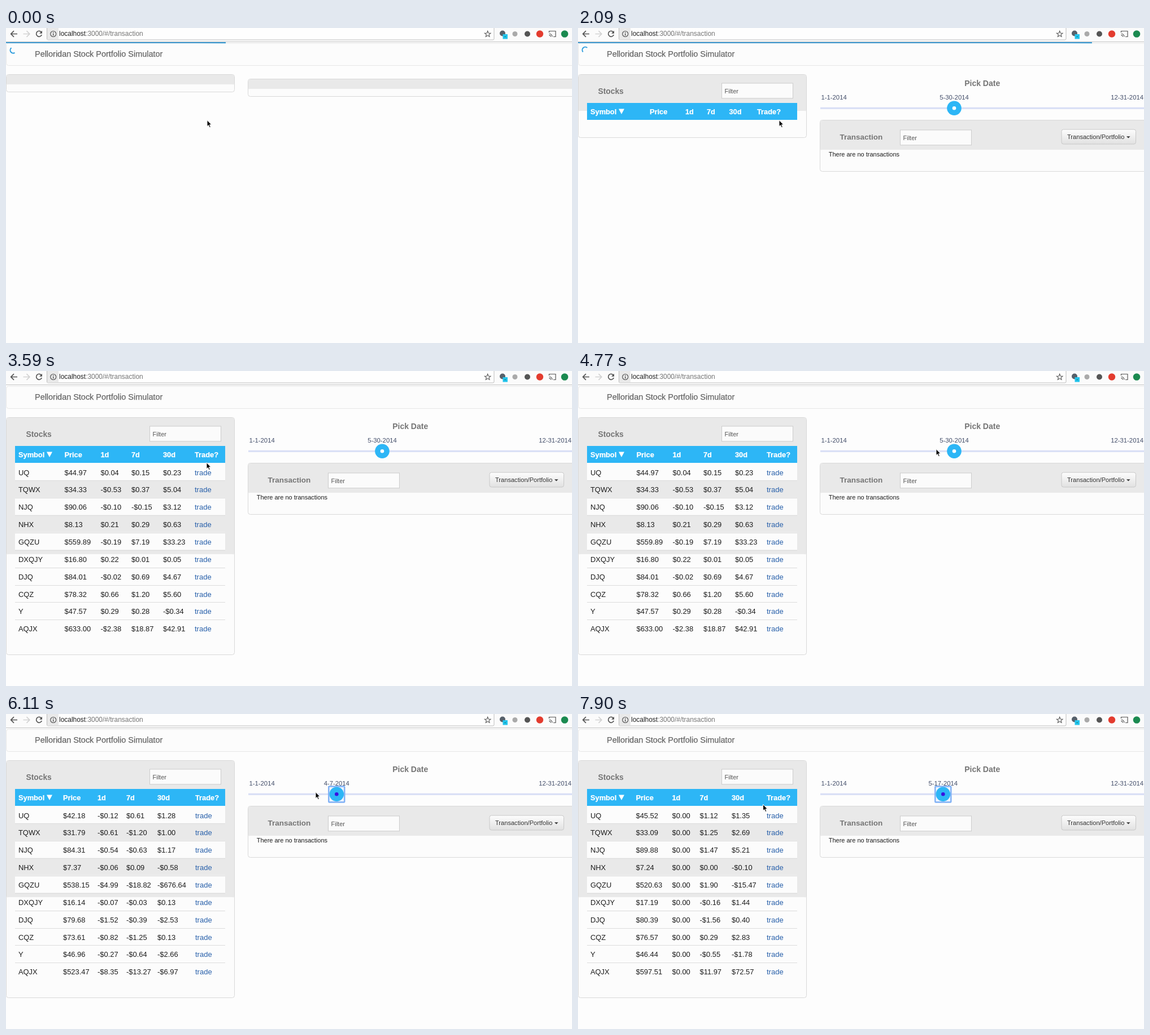
An HTML page for the animation above (8000 ms loop, 1002 by 559 pixels).

```html
<!DOCTYPE html>
<html lang="en">
<head>
<meta charset="utf-8">
<title>Portfolio simulator</title>
<style>
html, body { margin: 0; width: 100%; height: 100%; overflow: hidden; background: #fdfdfd; }
svg { display: block; width: 1002px; height: 559px; font-family: "Liberation Sans", Arial, sans-serif; }
text { white-space: pre; }
</style>
</head>
<body>
<svg id="stage" viewBox="0 0 1002 559">
  <defs>
    <linearGradient id="button" x2="0" y2="1"><stop stop-color="#fdfdfd"/><stop offset="1" stop-color="#e1e1e1"/></linearGradient>
    <linearGradient id="peg"><stop stop-color="#29a0e0" stop-opacity="0"/><stop offset="1" stop-color="#29a0e0" stop-opacity=".45"/></linearGradient>
  </defs>
  <g id="page"></g>
  <g id="loader"></g>
  <g id="chrome"></g>
  <g id="cursor"></g>
</svg>
<script>
const LOOP = 8000, TICK = 149.2;
const VIEW_AT = 1790, DATA_AT = 2238;
const BLUE = '#2db6f6', GREY = '#e9e9e9', EDGE = '#d9d9d9', INK = '#1c1c1c';
const symbols = 'UQ TQWX NJQ NHX GQZU DXQJY DJQ CQZ Y AQJX'.split(' ');
const headings = ['Price', '1d', '7d', '30d', 'Trade?'];

// Each day: start time, slider centre, label, column starts, and rows of price / 1d / 7d / 30d.
const days = [
  { at: 0, x: 666, label: '5-30-2014', cols: [103.5, 167.5, 222, 278, 334], rows:
    '44.97 0.04 0.15 0.23|34.33 -0.53 0.37 5.04|90.06 -0.10 -0.15 3.12|8.13 0.21 0.29 0.63|559.89 -0.19 7.19 33.23|' +
    '16.80 0.22 0.01 0.05|84.01 -0.02 0.69 4.67|78.32 0.66 1.20 5.60|47.57 0.29 0.28 -0.34|633.00 -2.38 18.87 42.91' },
  { at: 5070, x: 634.3, label: '5-9-2014', cols: [102.5, 166, 220, 273.5, 335], rows:
    '44.40 0.14 0.33 0.32|31.84 0.11 -0.16 0.13|88.41 0.50 1.05 4.38|7.24 -0.06 -0.11 -0.57|518.73 7.73 -9.20 -45.41|' +
    '17.35 0.22 0.45 1.52|81.95 0.35 1.64 1.48|76.28 0.42 2.42 1.83|46.99 -0.15 -0.74 -0.17|585.54 -2.45 -7.04 55.22' },
  { at: 5810, x: 585.3, label: '4-7-2014', cols: [101, 162, 213, 268, 335], rows:
    '42.18 -0.12 0.61 1.28|31.79 -0.61 -1.20 1.00|84.31 -0.54 -0.63 1.17|7.37 -0.06 0.09 -0.58|538.15 -4.99 -18.82 -676.64|' +
    '16.14 -0.07 -0.03 0.13|79.68 -1.52 -0.39 -2.53|73.61 -0.82 -1.25 0.13|46.96 -0.27 -0.64 -2.66|523.47 -8.35 -13.27 -6.97' },
  { at: 6550, x: 541.8, label: '3-9-2014', cols: [102, 177, 225, 279, 335], rows:
    '40.90 0.00 -0.13 1.79|30.79 0.00 0.29 0.36|83.14 0.00 -0.04 2.22|7.95 0.00 0.37 0.29|1,214.79 0.00 -0.86 37.35|' +
    '16.01 0.00 -0.86 -0.07|82.21 0.00 1.40 6.54|73.48 0.00 0.34 7.04|49.62 0.00 0.99 0.28|530.44 0.00 4.20 10.76' },
  { at: 7300, x: 646.3, label: '5-17-2014', cols: [102.5, 166.5, 215.5, 272, 334], rows:
    '45.52 0.00 1.12 1.35|33.09 0.00 1.25 2.69|89.88 0.00 1.47 5.21|7.24 0.00 0.00 -0.10|520.63 0.00 1.90 -15.47|' +
    '17.19 0.00 -0.16 1.44|80.39 0.00 -1.56 0.40|76.57 0.00 0.29 2.83|46.44 0.00 -0.55 -1.78|597.51 0.00 11.97 72.57' }
];

// Pointer stops: time, x, y
const pointerStops = [
  [0, 356, 163], [3590, 355, 162], [3740, 352, 161], [3890, 385, 158], [4030, 470, 150], [4180, 565, 143],
  [4330, 635, 139], [4480, 656, 138], [4620, 637, 138], [4770, 634, 138], [5360, 592, 138], [5510, 585, 138],
  [6110, 548, 138], [6250, 541, 138], [6850, 625, 139], [7000, 646, 138], [7600, 570, 146], [7750, 390, 156], [7900, 327.5, 160]
];

const text = (x, y, str, size, fill = '#333', extra = '') =>
  `<text x="${x}" y="${y}" font-size="${size}" fill="${fill}" ${extra}>${str}</text>`;
const bold = (x, y, str, size, fill = '#757575', extra = '') => text(x, y, str, size, fill, 'font-weight="bold" ' + extra);
const rect = (x, y, w, h, fill, extra = '') => `<rect x="${x}" y="${y}" width="${w}" height="${h}" fill="${fill}" ${extra}/>`;
const path = (d, stroke, width = 1, fill = 'none') =>
  `<path d="${d}" fill="${fill}" stroke="${stroke}" stroke-width="${width}"/>`;
const circle = (x, y, r, fill, extra = '') => `<circle cx="${x}" cy="${y}" r="${r}" fill="${fill}" ${extra}/>`;
const money = v => v[0] === '-' ? '-$' + v.slice(1) : '$' + v;
const lastBefore = (list, t, time) => list.filter(item => time(item) <= t).pop();

function panel(x, y, w, h, headHeight) {
  return rect(x + .5, y + .5, w - 1, h - 1, '#fcfcfc', `stroke="${EDGE}" rx="4"`) +
    rect(x + 1, y + 1, w - 2, headHeight, GREY, 'rx="3"') +
    rect(x + 2, y + headHeight, w - 4, 6, '#fcfcfc', 'rx="2"');
}

const filterBox = (x, y) =>
  rect(x + .5, y, 126, 26.8, '#fbfbfb', 'stroke="#ccc"') + text(x + 5.5, y + 17.5, 'Filter', 11, '#555');

function tableHead(cols) {
  const title = (x, name) => bold(x, 152.6, name, 12.8, '#fff', 'stroke="#fff" stroke-width=".25"');
  return rect(16, 133, 372, 30, BLUE) + title(22, 'Symbol') + path('M72 143.5h10l-5 9.5z', 'none', 0, '#fff') +
    headings.map((name, i) => title(cols[i], name)).join('');
}

function tableRows(day) {
  return day.rows.split('|').map((row, i) => {
    const top = 163 + 30.86 * i, base = top + 21.6;
    const stripe = i % 2 ? '' : rect(16, top, 372, 30.86, '#fcfcfc');
    const line = i ? rect(16, Math.ceil(top), 372, 1, '#dcdcdc') : '';
    return stripe + line + text(22, base, symbols[i], 12.9, INK) +
      row.split(' ').map((v, c) => text(day.cols[c], base, money(v), 12.9, INK)).join('') +
      text(day.cols[4], base, 'trade', 13, '#2860aa');
  }).join('');
}

function slider(day) {
  const date = (x, label, anchor) => text(x, 126.5, label, 11.3, '#414c68', `text-anchor="${anchor}"`);
  const focused = day.at > 0;
  const ring = focused ? rect(day.x - 14, 128.5, 28, 28, '#eef4fe', 'stroke="#7fb0f5" stroke-width="2.4" rx="1"') : '';
  return bold(715.7, 102.7, 'Pick Date', 14, '#757575', 'text-anchor="middle"') +
    date(430.5, '1-1-2014', 'start') + date(day.x, day.label, 'middle') + date(1001, '12-31-2014', 'end') +
    rect(429, 140.7, 573, 3.2, '#d9dff6') + ring +
    circle(day.x, 142.3, 12.8, BLUE) + circle(day.x, 142.3, 3.3, focused ? '#3a10e0' : '#fff');
}

function page(t) {
  const nav = rect(.5, 27, 1010, 39.5, '#fcfcfc', 'stroke="#e7e7e7" rx="4"') +
    text(51, 50.6, 'Pelloridan Stock Portfolio Simulator', 14.45, '#666', 'stroke="#666" stroke-width=".25"');
  if (t < VIEW_AT) return nav + panel(0, 82, 405, 32, 18) + panel(428, 90, 600, 32, 18);

  const loaded = t >= DATA_AT;
  const day = lastBefore(days, t, d => d.at);
  return nav + panel(0, 82, 405, loaded ? 422 : 113, loaded ? 243 : 65) +
    bold(35.5, 116.8, 'Stocks', 13.8) + filterBox(254, 98) +
    (loaded ? tableRows(day) : '') + tableHead(loaded ? day.cols : [127, 190, 228, 267.5, 317]) +
    slider(day) + panel(428, 163, 600, 92, 53) +
    bold(463.5, 198.4, 'Transaction', 13.5) + filterBox(570, 181) +
    rect(856, 180, 131.5, 26, 'url(#button)', 'stroke="#c8c8c8" rx="3.5"') +
    text(866, 197, 'Transaction/Portfolio', 11.1) + path('M971 192.2h6.6l-3.3 3.4z', 'none', 0, '#333') +
    text(443.7, 228, 'There are no transactions', 11, INK);
}

function loader(t) {
  if (t > 2680) return '';
  const now = Math.floor(t / TICK + .01) * TICK;
  const width = now < 1200 ? 389 + 437 * now / 1190 : now < 2200 ? 826 + 84 * (now - 1190) / 900 : 1002;
  const opacity = Math.min(1, Math.max(0, 1 - (now - DATA_AT) / 450));
  const turn = now / 400 * 360;
  return `<g opacity="${opacity}">` + rect(0, 25, width, 2, '#3f9bd3') + rect(width - 52, 26.5, 52, 1, 'url(#peg)') +
    `<g transform="rotate(${turn} 13 39.2)">` + path('M9.5 35.2A5.3 5.3 0 0 0 15.5 43.9', '#2f9ddd', 2) + '</g></g>';
}

function chrome() {
  const ink = '#555';
  const arrow = (x, d, color) => path(`M${x - 5 * d} 10.5h${11 * d}M${x} 5.2l${-5.3 * d} 5.3l${5.3 * d} 5.3`, color, 1.7);
  const star = Array.from({ length: 10 }, (_, i) => {
    const a = i * Math.PI / 5 - Math.PI / 2, r = i % 2 ? 2.4 : 5.6;
    return (852.7 + r * Math.cos(a)).toFixed(1) + ' ' + (10.9 + r * Math.sin(a)).toFixed(1);
  }).join('L');
  return rect(0, 0, 1002, 24, '#fbfbfb') + rect(0, 24, 1002, 1, '#c4c4c4') +
    rect(72.5, -4, 791.5, 25, '#fefefe', 'stroke="#bdbdbd" rx="2"') + rect(73, 0, 20, 20.5, '#e9e9e9') +
    arrow(14, 1, ink) + arrow(36.5, -1, '#d2d2d2') +
    path('M62.7 7.4A5 5 0 1 0 63.3 12', ink, 1.7) + path('M64 4.7v5h-5z', 'none', 0, ink) +
    circle(83.7, 10.5, 5, 'none', `stroke="${ink}" stroke-width="1.2"`) + path('M83.7 9.7v3.8M83.7 7.3v1.4', ink, 1.4) +
    text(94, 14.4, 'localhost<tspan fill="#757575">:3000/#/transaction</tspan>', 11.95, '#222') +
    path(`M${star}z`, ink, 1.1) +
    circle(879, 9.5, 5, '#56606a') + rect(879.5, 11, 8.5, 8.5, '#22c3ec') + rect(882.5, 15, 2.5, 1, '#176') +
    circle(901, 10.5, 4.5, '#aaa') + circle(923, 10.5, 5, '#555') + circle(945, 10.5, 6.2, '#e33b2e') +
    path('M961.5 8V5.5h11.5v10h-4M961.5 10a5.5 5.5 0 0 1 5.5 5.5M961.5 12.7a2.8 2.8 0 0 1 2.8 2.8', ink, 1.2) +
    circle(989, 10.5, 6.3, '#1b8a50');
}

function pointer(t) {
  const [, x, y] = lastBefore(pointerStops, t, s => s[0]);
  const day = lastBefore(days, t, d => d.at);
  const hand = day.at > 0 && Math.abs(x - day.x) < 3;
  const shape = hand
    ? path('M-.8 9.5V2.3c0-1.6 2-1.6 2 0V6c.5-.8 1.8-.6 1.9.3.6-.7 1.8-.4 1.9.5.7-.5 1.7-.1 1.7.9v3.2l-1 2v1.8H.6L-3 9.3c-.8-1.3.7-2 1.4-1z', '#111', 1.1, '#fff') +
      path('M1.4 10v3M3.2 10v3M5 10v3', '#111', .7)
    : path('M0 .5v11.2l2.5-2.3 1.9 4.2 1.9-.8-1.8-4.1h3.5z', '#fff', 1, '#000');
  return `<g transform="translate(${x} ${y})">${shape}</g>`;
}

const painted = {};
function paint(id, markup) {
  if (painted[id] === markup) return;
  painted[id] = markup;
  document.getElementById(id).innerHTML = markup;
}

function draw(now) {
  const t = now % LOOP;
  paint('page', page(t));
  paint('loader', loader(t));
  paint('cursor', pointer(t));
  requestAnimationFrame(draw);
}

paint('chrome', chrome());
draw(0);
</script>
</body>
</html>
```
